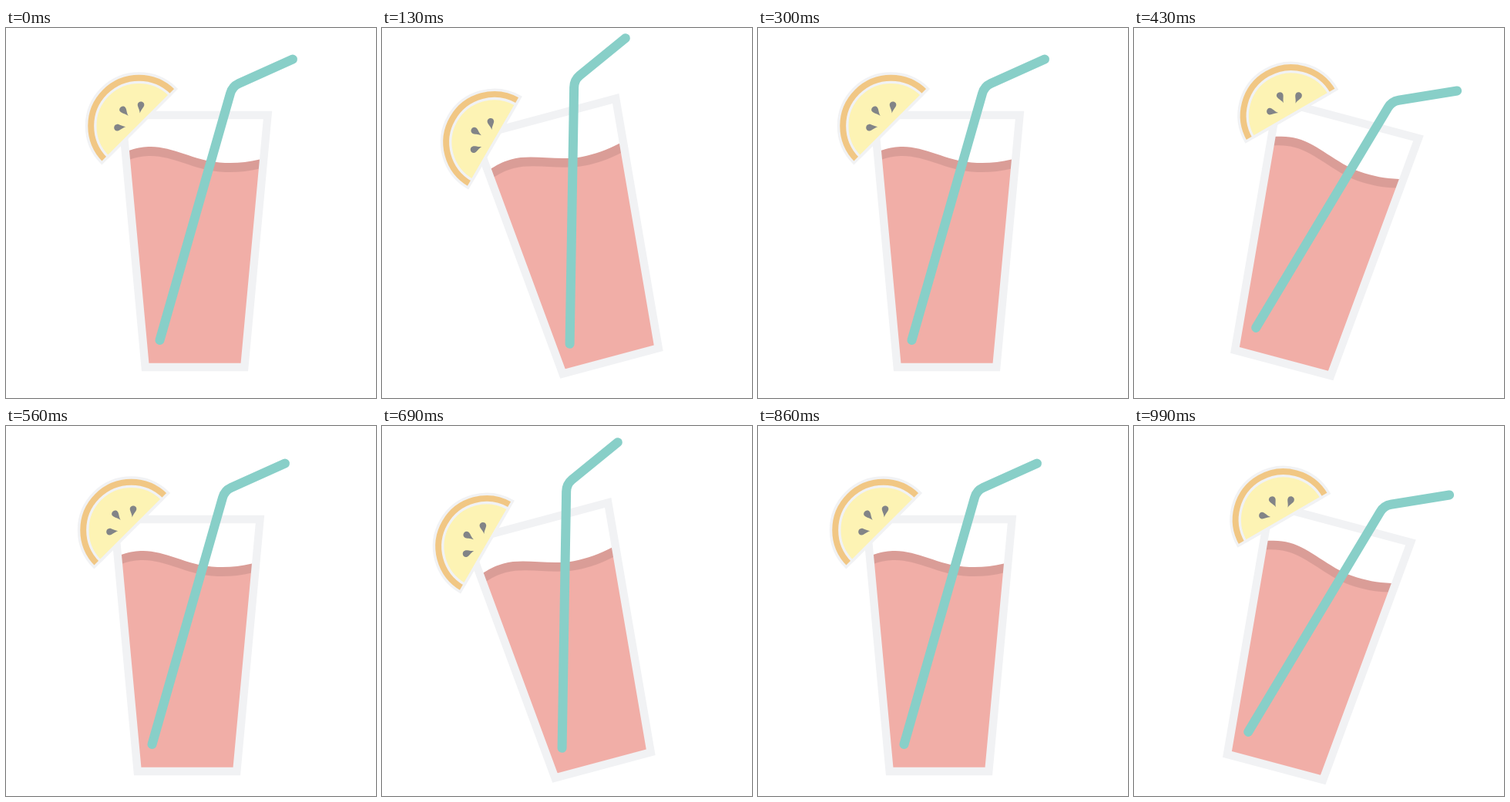
An HTML page with a canvas that plays this animation: 480x480 px, repeating every 1120 ms.

```html
<!DOCTYPE html>
<html lang="en">
<head>
<meta charset="utf-8">
<title>Dancing drink</title>
<style>
html, body { margin: 0; width: 100%; height: 100%; overflow: hidden; background: #fff; }
canvas { display: block; width: 480px; height: 480px; }
</style>
</head>
<body>
<canvas id="stage" width="480" height="480"></canvas>
<script>
const ctx = document.getElementById('stage').getContext('2d');

const GLASS = '#f1f2f4', PINK = '#f1aea7', DARK = '#da9d97', STRAW = '#88cfc8';
const RIND = '#f1c784', FLESH = '#fdf3b4', SEED = '#828487';

const LOOP = 1120;
const TILT = 15 * Math.PI / 180;
const SHIFT = [-10, 8];

// [start ms, tilt direction, shifted]
const POSES = [
  [0, 0, 0], [130, -1, 0], [300, 0, 0], [430, 1, 0],
  [560, 0, 1], [690, -1, 1], [860, 0, 1], [990, 1, 1]
];

function fill(path, color) {
  ctx.fillStyle = color;
  ctx.fill(path);
}

function stroke(path, color, width, cap = 'butt', join = 'miter') {
  ctx.strokeStyle = color;
  ctx.lineWidth = width;
  ctx.lineCap = cap;
  ctx.lineJoin = join;
  ctx.stroke(path);
}

function liquid(drop) {
  const p = new Path2D();
  const y = v => v + drop;
  p.moveTo(155, y(160.5));
  p.lineTo(161, y(158.5));
  p.bezierCurveTo(172, y(155), 179, y(154), 188, y(154));
  p.bezierCurveTo(216, y(154), 245, y(172), 277, y(174.5));
  p.bezierCurveTo(296, y(176), 311, y(174.5), 329, y(170.5));
  p.lineTo(334, y(169));
  p.lineTo(309, 438);
  p.lineTo(181, 438);
  p.closePath();
  return p;
}

function halfDisc(r) {
  const p = new Path2D();
  p.arc(172.5, 127, r, Math.PI * 0.75, Math.PI * 1.75);
  p.closePath();
  return p;
}

const glass = new Path2D('M150.5 113H339.5L309.3 440H180.7Z');
const straw = new Path2D('M372 40.5L302 72Q293.5 76 291 85L199.5 405');
const seed = new Path2D('M0 0C5-1 8-4.3 11-4.3C16.5-4.3 16.5 4.3 11 4.3C8 4.3 5 1 0 0Z');
const wave = liquid(0), body = liquid(12);
const rind = halfDisc(68), flesh = halfDisc(56.7);

function drawSeed(x, y, degrees) {
  ctx.save();
  ctx.translate(x, y);
  ctx.rotate(degrees * Math.PI / 180);
  fill(seed, SEED);
  ctx.restore();
}

function drawDrink() {
  fill(wave, DARK);
  fill(body, PINK);
  stroke(glass, GLASS, 10.4);
  stroke(straw, STRAW, 12, 'round', 'round');

  fill(rind, RIND);
  fill(flesh, FLESH);
  stroke(flesh, GLASS, 3.3);
  stroke(rind, GLASS, 3.5);
  drawSeed(158.7, 114, 229);
  drawSeed(173.7, 110.5, 277);
  drawSeed(155.3, 128.2, 175);
}

function render(now) {
  const t = now % LOOP;
  const [, lean, moved] = POSES.filter(p => p[0] <= t).pop();
  ctx.fillStyle = '#fff';
  ctx.fillRect(0, 0, 480, 480);
  ctx.save();
  ctx.translate(240 + moved * SHIFT[0], 240 + moved * SHIFT[1]);
  ctx.rotate(lean * TILT);
  ctx.translate(-240, -240);
  drawDrink();
  ctx.restore();
}

let start = null;
function tick(now) {
  if (start === null) start = now;
  render(Math.max(0, now - start));
  requestAnimationFrame(tick);
}
render(0);
requestAnimationFrame(tick);
</script>
</body>
</html>
```
